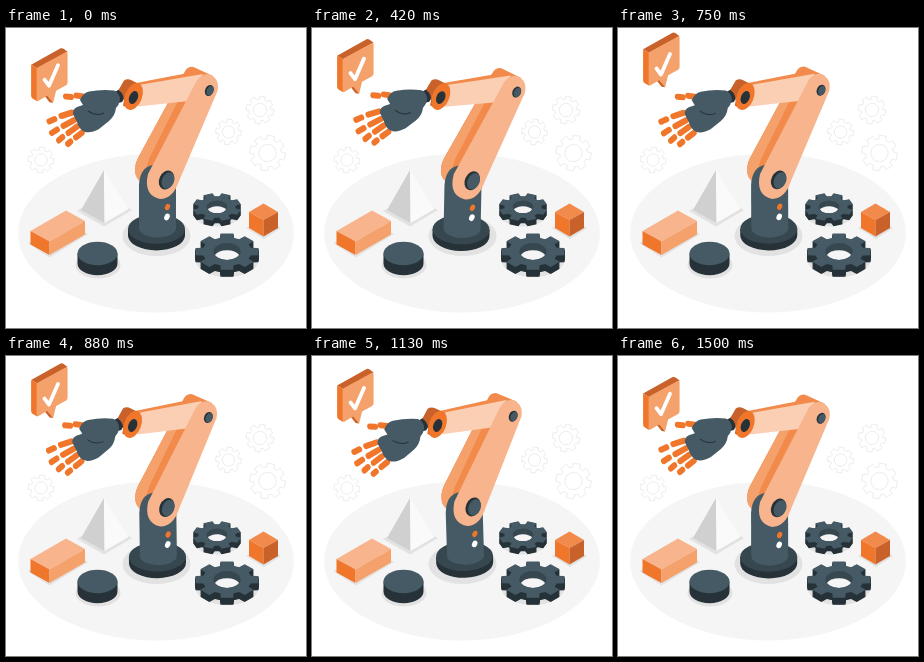
Recreate the animation shown at these times as an HTML page. Size 300 by 300 pixels, loop 1.54 s.

```html
<!DOCTYPE html>
<html lang="en">
<head>
<meta charset="utf-8">
<title>Robot arm</title>
<style>
  html, body { margin: 0; height: 100%; overflow: hidden; background: #fff; }
  svg { display: block; width: 100vw; height: 100vh; }
  .slate { fill: #455a64; }
  .steel { fill: #37474f; }
  .ink { fill: #263238; }
  .orange { fill: #f0762b; }
  .rust { fill: #c9622a; }
  .amber { fill: #f28a4c; }
  .peach { fill: #f5a16b; }
  .cream { fill: #f8b48c; }
  .pale { fill: #fbcfb4; }
  .shade { fill: #e2e2e2; }
  .floor { fill: #f5f5f5; }
  .ghost { fill: none; stroke: #ededed; }
  .fingers { fill: none; stroke-linecap: round; stroke-width: 5; }
</style>
</head>
<body>
<svg viewBox="0 0 300 300">
  <ellipse class="floor" cx="150" cy="205" rx="138" ry="79.500"/>
  <g id="ghosts"></g>

  <!-- pyramid -->
  <path class="shade" d="M71 183L98 167L126 182L98 198.500Z"/>
  <path fill="#d0d0d0" d="M98 142L75 182L98.500 195Z"/>
  <path fill="#fafafa" d="M98 142L98.500 195L122.500 181Z"/>

  <!-- brick -->
  <path class="shade" d="M21.500 215L60 194L82 206L43.500 229.500Z"/>
  <path class="cream" d="M24.500 203L60 182.500L79 193L43.500 213.500Z"/>
  <path class="orange" d="M24.500 203L43.500 213.500V227L24.500 216.500Z"/>
  <path class="peach" d="M43.500 213.500L79 193V206.500L43.500 227Z"/>

  <!-- disc -->
  <ellipse class="shade" cx="92" cy="237" rx="22.500" ry="13.500"/>
  <path class="ink" d="M71.500 225.500V235.500A20 11.700 0 0 0 111.500 235.500V225.500Z"/>
  <ellipse class="slate" cx="91.500" cy="225.500" rx="20" ry="11.800"/>

  <!-- cube -->
  <path class="shade" d="M240 200L258 190L275 200L258 211Z"/>
  <path class="amber" d="M243 184L257.500 175.500L272 184L257.500 192Z"/>
  <path class="orange" d="M243 184L257.500 192V208.500L243 200Z"/>
  <path class="rust" d="M257.500 192L272 184V200L257.500 208.500Z"/>

  <g id="gears"></g>
  <ellipse class="shade" cx="150.500" cy="208" rx="34" ry="20"/>

  <g id="robot">
    <!-- plinth -->
    <path class="ink" d="M122 201V207.500A28.500 15 0 0 0 179 207.500V201Z"/>
    <ellipse class="steel" cx="150.500" cy="201" rx="28.500" ry="14.800"/>

    <!-- upper arm, rear -->
    <path class="amber" d="M130 148Q127.500 139 132 130L178 45Q181.500 37.500 187.500 39L207 48L150 165Z"/>
    <path class="peach" d="M130 148Q127.500 139 132 130L168 64L175 67L143 131Q138 144 140 155Q132 154 130 148Z"/>

    <!-- column -->
    <path class="slate" d="M133 200V157Q134 139 147 137L170 150V200A18.500 9.500 0 0 1 133 200Z"/>
    <ellipse class="orange" cx="161.500" cy="179" rx="2.400" ry="3.300" transform="rotate(25 161.500 179)"/>
    <ellipse fill="#fff" cx="161" cy="189" rx="2.600" ry="3.500" transform="rotate(25 161 189)"/>

    <!-- forearm -->
    <path class="amber" d="M130 55L190 43.500Q196 44 197 49L130 62Z"/>
    <path class="pale" d="M130 57.500L197 46L183 73L132 78.500Z"/>

    <!-- upper arm, front -->
    <path class="cream" d="M142 146L190.500 53Q196 44.500 204 46.500Q214 51 211.500 63L173 153Q167 171 154 171Q137 167 142 146Z"/>
    <ellipse class="ink" cx="160.500" cy="152" rx="7.200" ry="9.800" transform="rotate(24 160.500 152)"/>
    <ellipse class="slate" cx="162" cy="152.500" rx="6" ry="8.500" transform="rotate(24 162 152.500)"/>
    <ellipse class="ink" cx="203.300" cy="62.500" rx="4.200" ry="5.700" transform="rotate(24 203.300 62.500)"/>
    <ellipse class="slate" cx="204" cy="62.800" rx="3.300" ry="4.900" transform="rotate(24 204 62.800)"/>

    <!-- wrist -->
    <path class="ink" d="M107 65L113 61.500Q119 63 119 69L116 74L108 76Z"/>
    <path class="rust" d="M112.500 62L118 52.500Q121.500 50 126 52.500L135 57L125 82L117 77.500Q120 67 112.500 62Z"/>
    <ellipse class="orange" cx="127.500" cy="68.500" rx="8.500" ry="14" transform="rotate(22 127.500 68.500)"/>
    <ellipse class="ink" cx="127.500" cy="69.500" rx="4.300" ry="6.700" transform="rotate(22 127.500 69.500)"/>

    <!-- hand -->
    <g class="fingers">
      <use href="#fingers" stroke="#c9622a" x=".4" y="1"/>
      <path id="fingers" d="M59.500 68L65 68.500M70 67L77 68M43 93L48.500 90.500M55 87.500L66 84M45.500 104.500L51 101M57 97.500L68 91.500M52.500 112L56.500 108.500M62 104.500L71 98M61.500 115.500L64.500 113M69.500 109L76 104"/>
    </g>
    <path class="slate" d="M74 72Q77 64.500 83 63.500Q96 61 108 62.500Q114 65 114 72Q113 77 110 80Q109 88 103 93L93 101Q84 106 78 103.500Q73 101 71 94L67 86Q66.500 81 71 79L77 77Z"/>
    <path d="M82 83Q90 89 98 85" fill="none" stroke="#263238"/>
  </g>

  <g id="bubble">
    <path class="rust" d="M25.500 37.500L55 21Q56.500 20.500 58 21.500L62 24.500L31.500 41Z"/>
    <path class="orange" d="M25.500 37.500L31.500 41V74L26.500 71Q25.500 70 25.500 68Z"/>
    <path class="rust" d="M38.500 68L44 75L47.500 75.500L44 66Z"/>
    <path class="peach" d="M31 42.500Q31 41 32.500 40L60 25Q62 24 62 26.500V55Q62 57 60.500 58L50.500 63.500L47.500 75.500L41.500 68.500L33 73.500Q31 74.500 31 72Z"/>
  </g>
  <path id="check" d="M39 52.500L43.500 58.500L52.500 38" fill="none" stroke="#fff" stroke-width="3.800" stroke-linecap="round" stroke-linejoin="round"/>
</svg>
<script>
const LOOP = 1540;
const $ = id => document.getElementById(id);
$("fingers").parentNode.style.stroke = "";
$("fingers").style.stroke = "#f0762b";

// Toothed outline with eight teeth; squash flattens it onto the floor.
function gearPath(x, y, r, squash, turn) {
  const points = [];
  for (let i = 0; i < 8; i++)
    for (const [offset, k] of [[-.27, .77], [-.2, 1], [.2, 1], [.27, .77]]) {
      const a = i * Math.PI / 4 + offset + turn;
      points.push([x + r * k * Math.cos(a), y + r * k * squash * Math.sin(a)].map(v => v.toFixed(2)));
    }
  return `M${points.join("L")}Z`;
}

const ring = (x, y, rx, ry) =>
  `M${x - rx} ${y}a${rx} ${ry} 0 1 0 ${2 * rx} 0a${rx} ${ry} 0 1 0 ${-2 * rx} 0Z`;

function ghostGear(x, y, r, turn) {
  return `<path class="ghost" d="${gearPath(x, y, r, 1, turn)}${ring(x, y, r * .48, r * .48)}"/>`;
}

// Stacked sides, then the hole's wall, the floor seen through it and the top face.
function floorGear(x, y, r, depth, turn) {
  const rx = r * .42, ry = r * .26;
  const half = rx * Math.sqrt(1 - (depth / 2 / ry) ** 2);
  const shape = dy => gearPath(x, y + dy, r, .58, turn);
  let out = `<ellipse class="shade" cx="${x}" cy="${y + depth}" rx="${r}" ry="${r * .58}"/>`;
  for (let dy = depth; dy > 0; dy -= .5)
    out += `<path class="ink" d="${shape(dy)}"/>`;
  return out + `<path class="steel" d="${ring(x, y, rx, ry)}"/>
    <path class="floor" d="M${x - half} ${y + depth / 2}a${rx} ${ry} 0 0 1 ${2 * half} 0a${rx} ${ry} 0 0 1 ${-2 * half} 0Z"/>
    <path class="slate" fill-rule="evenodd" d="${shape(0)}${ring(x, y, rx, ry)}"/>`;
}

$("ghosts").innerHTML = ghostGear(254, 82, 14, .2) + ghostGear(222.5, 104, 13, .1)
  + ghostGear(261.5, 125, 18, .2) + ghostGear(35, 132, 13, .1);
$("gears").innerHTML = floorGear(211, 179, 24.3, 5.5, Math.PI / 8) + floorGear(221, 223.6, 32, 7, 0);

// Triangle wave: 1 at the peak time, -1 half a loop later.
function wave(t, peak) {
  const p = (t - peak + LOOP) / LOOP % 1;
  return Math.abs(p - .5) * 4 - 1;
}

function draw() {
  const t = performance.now() % LOOP;
  const lift = wave(t, -35) - .91;
  $("robot").setAttribute("transform", `rotate(${1.6 * (wave(t, 350) - .09)} 125 132)`);
  $("bubble").setAttribute("transform", `translate(-.4 ${8.4 * lift - .6})`);
  $("check").setAttribute("transform", `translate(-.5 ${6 * lift - .8})`);
  requestAnimationFrame(draw);
}
draw();
</script>
</body>
</html>
```
